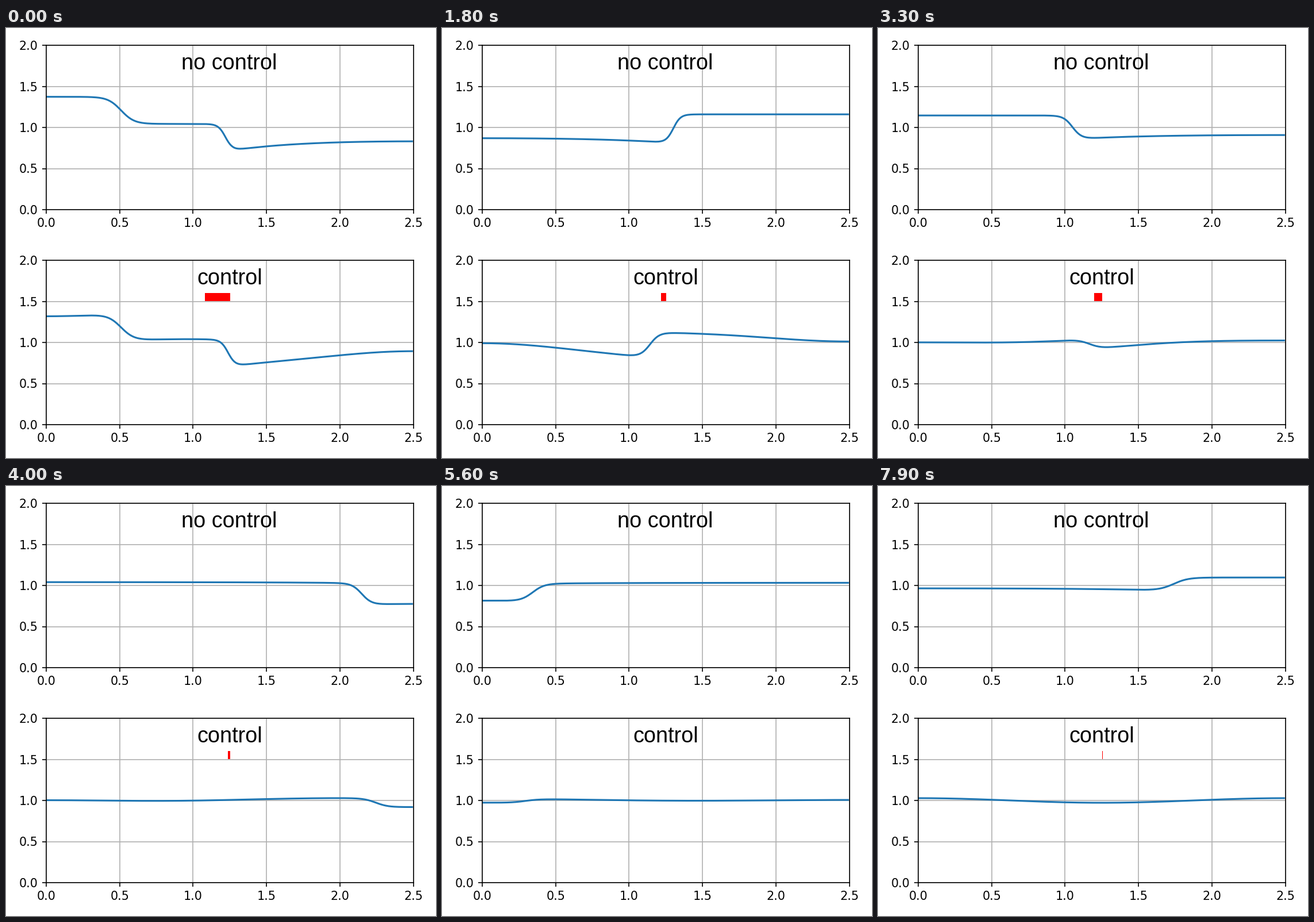
These frames come from a looping animation (748x748 px, 8 s). A matplotlib script:

```python
import numpy as np
import matplotlib.pyplot as plt
from matplotlib.animation import FuncAnimation
from matplotlib.patches import Rectangle

SIZE, DPI = 748, 136
FRAMES, STEP = 80, 100          # 80 x 100 ms
LENGTH = 2.5                    # tank length
DIP = .5                        # reach of the trough ahead of a bore

x = np.linspace(0, LENGTH, 251)[:-1]


def mode(n):
    return np.cos(n * np.pi * x / LENGTH)


def drop(centre, width):
    return (1 - np.tanh((x - centre) / width)) / 2


def bore(t, phase, jump, width):
    """Smoothed sawtooth running round the tank, reflected at both walls."""
    depth = np.interp(t, [0, .9], [.75, .25])
    level = depth * 2 * DIP / (2 * LENGTH)
    for y in (phase - x, phase + x):
        y = (y + LENGTH) % (2 * LENGTH) - LENGTH
        front = np.tanh(y / width)
        trough = depth * np.exp(np.minimum(y, 0) / DIP) * (1 - front) / 2
        level = level + front / 2 - y / (2 * LENGTH) - trough
    return jump * level


def first_wave(t):
    """Water piled at the left wall, which sinks and rebounds."""
    size = np.interp(t, [0, .9, 1.8], [.33, -.1, 0])
    return size * (drop(.51 - .29 * t, .09 + .1 * t) - .25)


def free_height(t):
    phase = np.interp(t, [0, .9, 1.8, 7.9], [1.222, 2.145, 3.7, 13.265])
    jump = .28 * np.exp(-.126 * (t - 1.8)) * np.interp(t, [0, .9, 1.2], [.54, .64, 1])
    width = .05 + .0085 * max(t - 1.8, 0)
    return 1 + first_wave(t) + bore(t, phase, jump, width)


def held_height(t):
    phase = np.interp(t, [0, .9, 1.8, 7.9], [1.24, 2.63, 3.86, 13.25])
    jump = np.interp(t, [0, .9, 1.8, 3.3, 4.7, 6.5], [.188, .1, .25, .1, .08, 0])
    counter = np.interp(t, [0, 1.8, 3.3, 4.7, 6.5], [.05, .115, .067, .05, 0])
    lift = np.interp(t, [0, .9, 1.8, 4.7], [-.02, .094, .018, 0])
    sag = np.interp(t, [4.7, 6.5, 7.9], [.006, .011, .028])
    return (1 + first_wave(t) + bore(t, phase, jump, .05 + .009 * t)
            - counter * np.sin(np.pi * phase / LENGTH) * mode(1)
            + lift * (mode(3) - .6 * mode(1)) + sag * mode(2))


def push(t):
    """Control force: a fading shove plus a short burst of sway."""
    sway = .006 + .038 * np.exp(-((t - 3.9) / 1.5) ** 2)
    return sway * np.cos(1.96 * (t - 4.85)) * min(t / 1.8, 1) - .172 * np.exp(-t / 1.4)


def pt(px):
    return px * 72 / DPI


fig = plt.figure(figsize=(SIZE / DPI, SIZE / DPI), dpi=DPI, facecolor="white")


def panel(top, title, centre):
    ax = fig.add_axes([69.8 / SIZE, 1 - (top + 286) / SIZE, 639 / SIZE, 286 / SIZE])
    ax.set(xlim=(0, LENGTH), ylim=(0, 2),
           xticks=np.arange(0, 2.6, .5), yticks=np.arange(0, 2.1, .5))
    ax.grid(True, color="#b0b0b0", linewidth=pt(1.65))
    ax.tick_params(labelsize=pt(20.6), length=pt(7.2), width=pt(1.65),
                   pad=pt(7.2), labelfontfamily="DejaVu Sans")
    for spine in ax.spines.values():
        spine.set_linewidth(pt(1.65))
    fig.text(centre / SIZE, 1 - (top + 42) / SIZE, title, ha="center",
             va="baseline", family="Liberation Sans", size=pt(37.7))
    line, = ax.plot([], [], color="#1f77b4", linewidth=pt(3.1))
    return ax, line


_, free_line = panel(30, "no control", 388.3)
ax, held_line = panel(404, "control", 388.8)
bar = ax.add_patch(Rectangle((1.253, 1.503), 0, .098, color="red",
                             linewidth=0, zorder=3))


def draw(i):
    t = i * STEP / 1000
    free_line.set_data(x, free_height(t))
    held_line.set_data(x, held_height(t))
    bar.set_width(push(t))
    return free_line, held_line, bar


anim = FuncAnimation(fig, draw, frames=FRAMES, interval=STEP, repeat=True,
                     repeat_delay=0)
plt.show()
```
